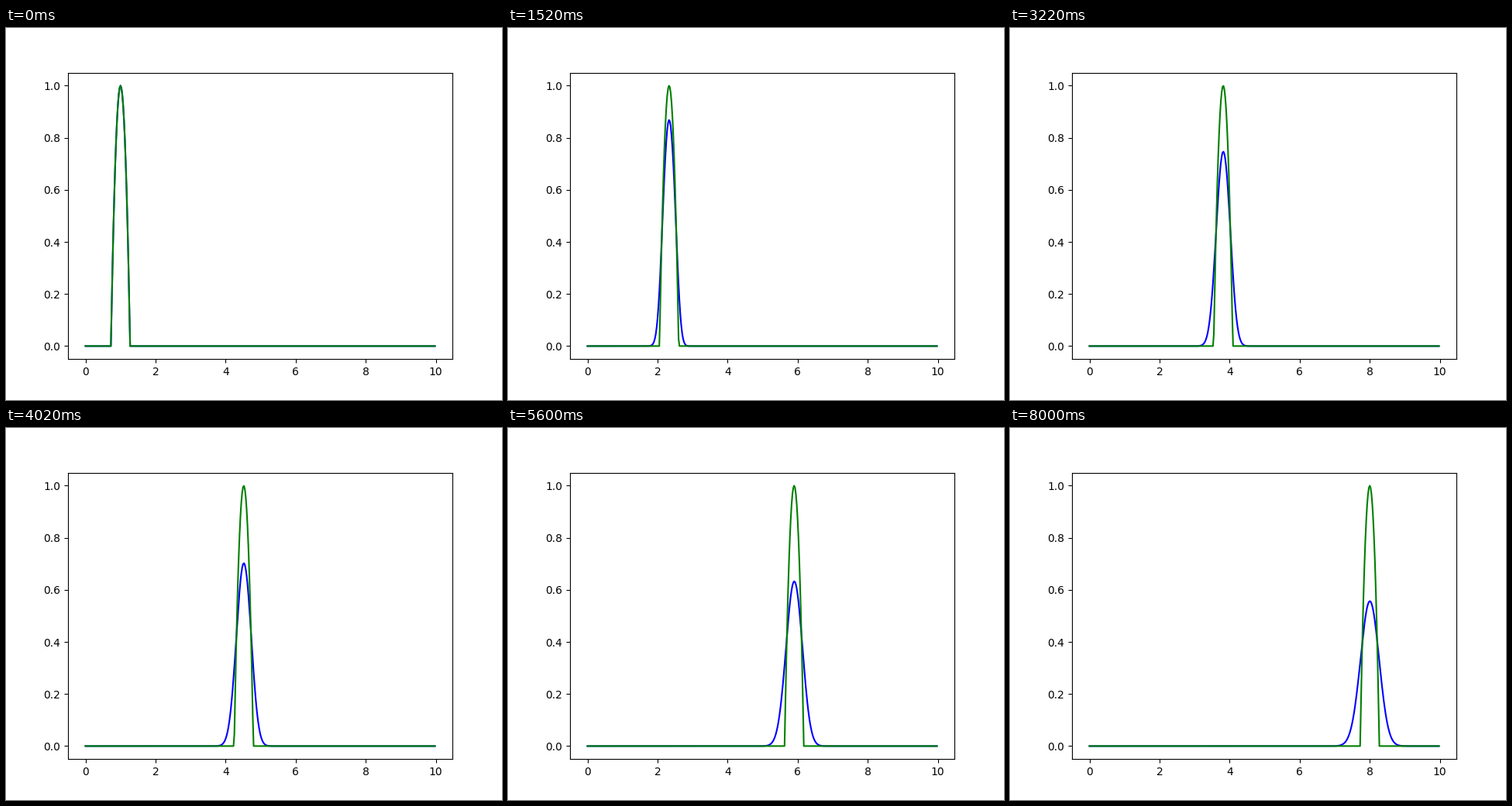
Write a matplotlib script that moves like this. It is 640 by 480 pixels and loops after 8020 ms.

```python
import numpy as np
import matplotlib.pyplot as plt
from matplotlib.animation import FuncAnimation

LENGTH = 10.0
CELLS = 400
SPEED = 1.0
COURANT = 0.7
STEPS = 400

dx = LENGTH / CELLS
dt = COURANT * dx / SPEED
x = np.arange(CELLS) * dx


def pulse(x):
    """Parabolic hump centred on x = 1."""
    return np.maximum(0, 1 - (x - 1) ** 2 / 0.075)


def upwind(u):
    """One first-order upwind step of the advection equation."""
    new = u.copy()
    new[1:] -= COURANT * (u[1:] - u[:-1])
    return new


history = [pulse(x)]
for _ in range(STEPS):
    history.append(upwind(history[-1]))

plt.rcParams["font.family"] = "DejaVu Sans"
fig, ax = plt.subplots(figsize=(6.4, 4.8), dpi=100)
numeric, = ax.plot(x, history[0], color="blue")
exact, = ax.plot(x, history[0], color="green")
ax.set_xlim(ax.get_xlim())
ax.set_ylim(-0.05, 1.05)


def update(n):
    numeric.set_ydata(history[n])
    exact.set_ydata(pulse(x - SPEED * n * dt))
    return numeric, exact


anim = FuncAnimation(fig, update, frames=STEPS + 1, interval=20,
                     repeat=True, repeat_delay=0)
plt.show()
```
